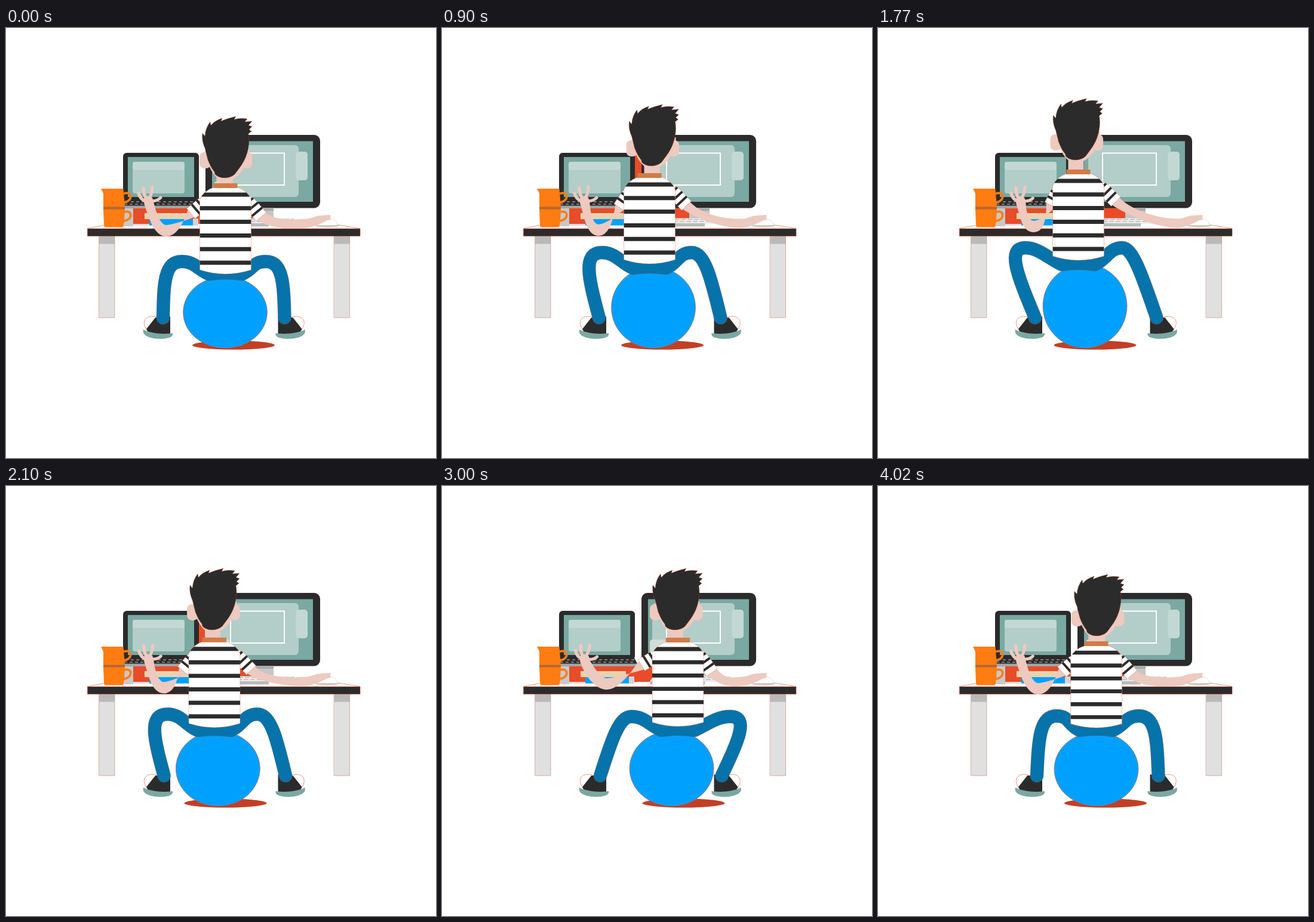
An HTML page with a canvas that plays this animation: 720 by 720 pixels, repeating every 4.05 s.

```html
<!DOCTYPE html>
<html lang="en">
<head>
<meta charset="utf-8">
<title>Bouncing at the desk</title>
<style>
html, body { margin: 0; width: 100%; height: 100%; overflow: hidden; background: #fff; }
canvas { display: block; }
</style>
</head>
<body>
<canvas id="stage" width="720" height="720"></canvas>
<script>
const g = document.getElementById('stage').getContext('2d');
const DARK = '#2b2b2b', RED = '#e84c28', SKIN = '#edc9bf', TEAL = '#7aa8a2', PANE = '#b3cdc8',
  TAB = '#c3d7d3', BLUE = '#00a1fe', JEANS = '#0673aa', ORANGE = '#ff7c12', WHITE = '#fff',
  FRINGE = 'rgba(232,76,40,.6)';
const LOOP = 4050, BOUNCE = 13.5;

// Poses: step, then one value per name below
const NAMES = ['headX', 'headY', 'left', 'chest', 'waist', 'ballX', 'ballTop', 'shadow',
  'kneeL', 'kneeR', 'kneeY', 'seat', 'ankle', 'elbowX', 'elbowY'];
const POSES = [
  [0, 329, 148, 324.5, 279, 393, 367, 416, 381, 294, 435, 391, 421, 263, 268, 349],
  [24, 313.5, 128, 304.5, 262, 376, 354, 400, 369, 268, 418, 376, 411, 263, 262, 348],
  [47, 293.5, 118, 292.5, 256, 370, 346.5, 395, 363.5, 247, 409, 368, 405, 263, 261, 342],
  [64, 326.5, 132, 323, 268, 380, 365.5, 406, 375.5, 297, 438, 378, 413, 266, 268, 347],
  [80, 353, 138, 352, 273, 384, 384.5, 410, 404.5, 317, 482, 386, 418, 265, 276, 341],
  [94, 365, 150, 358.5, 275, 385, 387, 414, 411, 322, 485, 387, 420, 265, 277, 340],
  [107, 329, 148, 322.5, 279, 387, 365.5, 412, 381, 299, 437, 385, 418, 266, 268, 349]
];
const SWING = { headY: 11, chest: 9, waist: 9, ballTop: 8, kneeY: 8, seat: 8, elbowY: 2 };

const bob = n => Math.cos(2 * Math.PI * n / BOUNCE);

// Smooth curve through the poses, with the bounce added on top
function poseAt(n) {
  const last = POSES.length - 1;
  let i = 0;
  while (i < last - 1 && n >= POSES[i + 1][0]) i++;
  const p = {};
  NAMES.forEach((name, k) => {
    const amp = SWING[name] || 0;
    const val = j => POSES[j][k + 1] - amp * bob(POSES[j][0]);
    const slope = j => {
      const a = Math.max(0, j - 1), b = Math.min(last, j + 1);
      return (val(b) - val(a)) / (POSES[b][0] - POSES[a][0]);
    };
    const h = POSES[i + 1][0] - POSES[i][0], u = (n - POSES[i][0]) / h, v = 1 - u;
    p[name] = val(i) * (1 + 2 * u) * v * v + val(i + 1) * u * u * (3 - 2 * u)
      + h * u * v * (slope(i) * v - slope(i + 1) * u) + amp * bob(n);
  });
  return p;
}

function fill(d, color, edge) {
  const path = new Path2D(d);
  g.fillStyle = color;
  g.fill(path);
  if (edge) line(path, edge, 0.6);
}
function line(d, color, width) {
  g.strokeStyle = color;
  g.lineWidth = width;
  g.lineCap = g.lineJoin = 'round';
  g.stroke(new Path2D(d));
}
function box(x, y, x2, y2, color, r = 0) {
  g.fillStyle = color;
  g.beginPath();
  g.roundRect(x, y, x2 - x, y2 - y, r);
  g.fill();
}
function oval(x, y, rx, ry, color, edge) {
  g.beginPath();
  g.ellipse(x, y, rx, ry, 0, 0, 7);
  g.fillStyle = color;
  g.fill();
  if (edge) { g.strokeStyle = edge; g.lineWidth = 0.6; g.stroke(); }
}
function at(x, y, draw, angle = 0) {
  g.save();
  g.translate(x, y);
  g.rotate(angle);
  draw();
  g.restore();
}
function dashes(d, color, width, dash) {
  g.save();
  g.setLineDash(dash);
  g.strokeStyle = color;
  g.lineWidth = width;
  g.lineCap = 'butt';
  g.stroke(new Path2D(d));
  g.restore();
}

function drawMonitor() {
  box(322, 301, 414, 328, RED);
  box(334, 179, 526, 301.5, DARK, 10);
  box(345, 189.5, 514, 291, TEAL);
  box(352, 196, 490, 283, PANE, 6);
  box(485, 207, 505, 255, TAB, 5);
  box(348, 257, 375, 283, '#d0dcd9', 5);
  g.strokeStyle = WHITE;
  g.lineWidth = 2;
  g.strokeRect(376, 209.5, 90, 53.5);
  box(414, 301.5, 448, 319, '#c6c6c6');
  box(414, 301.5, 448, 306, '#aaa');
}

function drawLaptop() {
  box(196, 209, 323, 291, DARK, 6);
  box(204, 216, 315, 283, TEAL);
  box(212, 224, 299, 277, PANE, 4);
  box(212, 224, 299, 238, TAB, 4);
  fill('M198 288H322L328 299H190Z', DARK);
  dashes('M200 291H322M198 295H324', '#ccc', 1.1, [5, 4]);
  box(192, 297.5, 328, 302, '#a5a5a5');
  box(198, 302, 213, 332, '#c9c9c9');
  box(213, 302, 322, 328, RED);
  box(213, 328, 322, 331, '#ddd');
  box(313, 319, 322, 330, '#d5d5d5');
  box(232, 310, 308, 320, '#e8d3ae');
  box(240, 320, 313, 330.5, BLUE);
}

function drawDesk() {
  fill('M348 327L354 318.5H482L492 328H440V333H348Z', '#ececec');
  dashes('M356 320.5H482M354 324H486', '#bdbdbd', 1.6, [8, 3]);
  box(348, 327, 440, 332, '#b9b9b9');
  line('M137 335.5L163 330.5M555 329.5L592 335.5', RED, 0.6);
  for (const x of [156, 549.5]) {
    box(x, 348, x + 26, 485, '#e0e0e0');
    box(x, 348, x + 26, 361.5, '#b9b9b9');
    g.strokeStyle = '#d08f80';
    g.lineWidth = 0.7;
    g.strokeRect(x, 348, 26, 137);
  }
  fill('M136.5 336H593V348.5H136.5Z', DARK, RED);
  oval(538, 330.5, 20, 3.5, '#d8c9c0');
  fill('M520 330Q521 319 540 319.5Q555 320 555 330Z', WHITE, '#d8c9c0');
}

function drawJug() {
  line('M198 277C213 273 212 291 197 292M198 308C213 304 212 322 197 323', ORANGE, 3.6);
  fill('M159 269H196.5L199 300H163V277Z', ORANGE);
  fill('M163 303H199L197.5 330Q197 333.5 193 333.5H168Q164 333.5 164 330Z', ORANGE);
  box(163, 299.5, 199, 303.5, '#b5672f');
}

function drawShoe() {
  fill('M236 506C226 492 233 482 246 483L252 484L240 507Z', WHITE, RED);
  fill('M235 504L250 485L275 483V513H240Z', DARK);
  fill('M230 505C245 512 262 513 279 511Q281 519 262 520.5C241 521 227 515 230 505Z', TEAL);
}

function legPaths(p) {
  const mid = p.left + 43, hipY = p.seat - 9;
  const shin = (ankle, knee, side) => {
    const cx = knee + side * (34 - 0.005 * (ankle - knee) ** 2);
    return { cx, x: ankle + (cx - ankle) * 0.6, y: 485 + (p.kneeY - 485) * 0.6 };
  };
  const ankleR = p.ankle + 203.5;
  const a = shin(p.ankle, p.kneeL, -1), b = shin(ankleR, p.kneeR, 1);
  const left = `M${p.ankle} 485C${a.x} ${a.y} ${a.cx} ${p.kneeY} ${p.kneeL} ${p.kneeY}`
    + `C${p.kneeL + 22} ${p.kneeY} ${mid - 48} ${hipY - 9} ${mid - 28} ${hipY}`;
  const right = `C${mid + 48} ${hipY - 9} ${p.kneeR - 22} ${p.kneeY} ${p.kneeR} ${p.kneeY}`
    + `C${b.cx} ${p.kneeY} ${b.x} ${b.y} ${ankleR} 485`;
  return {
    all: `${left}Q${mid} ${p.seat - 13} ${mid + 28} ${hipY}${right}`,
    gap: `M${mid + 28} ${hipY}${right}L${p.ballX} 485Z`
  };
}

function drawLower(p) {
  const legs = legPaths(p), ry = (536 - p.ballTop) / 2;
  oval(p.shadow, 531, 69, 7.5, '#c23f25');
  drawShoe();
  g.save();
  g.translate(730.5, 0);
  g.scale(-1, 1);
  drawShoe();
  g.restore();
  if (p.ballX > 386.5) fill(legs.gap, RED);
  oval(p.ballX, 536 - ry, 70.5, ry, BLUE, RED);
  line(legs.all, 'rgba(232,76,40,.45)', 22.8);
  line(legs.all, JEANS, 22);
  // Seat between the thighs, up to the hem
  fill(`M${p.left + 1} ${p.waist + 4}H${p.left + 85}L${p.left + 73} ${p.seat - 2}`
    + `Q${p.left + 43} ${p.seat - 4} ${p.left + 13} ${p.seat - 2}Z`, JEANS);
}

function drawSleeve(x, y, angle, length) {
  at(x, y, () => {
    const cloth = new Path2D(`M0 -6Q8 -11 18 -11H${length}V11H18Q8 11 0 6Z`);
    fill(cloth, WHITE, FRINGE);
    g.clip(cloth);
    for (const back of [35, 24, 13]) box(length - back, -12, length - back + 4, 12, DARK);
  }, angle);
}

function drawLeftArm(p, n) {
  const sx = p.left + 14, sy = p.chest + 7, ex = p.elbowX, ey = p.elbowY;
  const angle = Math.atan2(ey - 11 - sy, ex + 10 - sx), c = Math.cos(angle), s = Math.sin(angle);
  const cx = sx + 36 * c, cy = sy + 36 * s;
  fill(`M232 296C238 315 ${ex - 20} ${ey} ${ex} ${ey}Q${ex + 22} ${ey} ${cx - 9 * s} ${cy + 9 * c}`
    + `L${cx + 9 * s} ${cy - 9 * c}Q${ex + 14} ${ey - 20} ${ex} ${ey - 19}`
    + `Q${ex - 12} ${ey - 20} 247 291Z`, SKIN);
  const turn = n < 30 ? 0 : 0.04 + 0.05 * Math.exp(-(((n - 80) / 8) ** 2));
  at(239, 293, () => {
    fill('M-7 4L-9 -6Q-2 -15 6 -9L8 -1Q3 4 -7 4Z', SKIN);
    line('M-5 -3Q-14 -6 -17 -16M-4 -7Q-9 -16 -9 -25', SKIN, 5.5);
    line('M1 -8Q6 -17 6 -27M4 -4Q13 -2 20 -9', SKIN, 5);
  }, turn);
  drawSleeve(sx, sy, angle, 38);
}

function drawRightArm(p, n) {
  const sx = p.left + 76, sy = p.chest + 5, angle = 0.78 + (p.left - 292) * 0.003;
  const c = Math.cos(angle), s = Math.sin(angle);
  const cx = sx + 40 * c, cy = sy + 40 * s;
  const ax = cx - 9 * s, ay = cy + 9 * c, bx = cx + 9 * s, by = cy - 9 * c;
  fill(`M${ax} ${ay}C${ax + 20} ${Math.min(ay + 14, 340)} 470 338 508 334`
    + `L524 328L522 316L508 319C475 322 ${bx + 18} ${by + Math.min(22, 322 - by)} ${bx} ${by}Z`, SKIN);
  const click = (n > 58 && n < 69) || (n > 88 && n < 99);
  if (click) {
    fill('M506 320L522 314L532 319L524 328L508 334Z', SKIN);
    line('M520 319Q527 308 537 306M524 319Q533 311 541 311M525 321L540 317', SKIN, 4.5);
  } else {
    fill('M506 320C514 317 521 314 527 314L542 313Q546 315 542 317L544 319Q544 322 538 322L524 329L508 334Z', SKIN);
  }
  drawSleeve(sx, sy, angle, 42);
}

function drawShirt(p) {
  g.save();
  g.translate(p.left, p.chest);
  g.scale(1, (p.waist - p.chest) / 114);
  const torso = new Path2D('M23 -12H64Q79 -7 86 8V126Q43 140 0 126V8Q7 -7 23 -12Z');
  fill(torso, WHITE, FRINGE);
  g.clip(torso);
  for (let i = 0; i < 6; i++) box(0, i * 22.8 - 3.5, 86, i * 22.8 + 3.5, DARK);
  g.restore();
  box(p.left + 23, p.chest - 19, p.left + 63, p.chest - 11, '#d07c48');
}

function drawHead() {
  box(-5, 60, 14, 87, SKIN, 8);
  box(65, 60, 83.5, 87, SKIN, 8);
  fill('M6 60L11 83Q22 108 38 108Q55 107 67 90L78 66V55Z', SKIN);
  fill('M4 53C0 44 -1 36 0 28L4 33Q5 19 13 9L14 15Q22 6 33 3L31 8Q42 3 56 0L53 5Q63 2 75 4'
    + 'L71 9L83 8L77 15L83 17L78 22L82 25L77 29Q79 40 77 51C75 66 68 79 60 89L54 97Q47 103 37 103'
    + 'Q27 103 21 97L20 93Q14 86 9 73Z', DARK, FRINGE);
}

function draw(n) {
  const p = poseAt(n);
  g.fillStyle = WHITE;
  g.fillRect(0, 0, 720, 720);
  if (p.headX < 327) box(322, p.headY + 70, 335, 302, RED);
  drawMonitor();
  drawLaptop();
  drawDesk();
  drawJug();
  drawLower(p);
  box(p.headX + 25, p.headY + 90, p.headX + 51, p.chest - 8, SKIN);
  drawLeftArm(p, n);
  drawRightArm(p, n);
  drawShirt(p);
  at(p.headX, p.headY, drawHead);
}

// Four steps in every 150 ms, the first one held twice as long
function stepAt(ms) {
  const rest = ms % 150;
  return Math.floor(ms / 150) * 4 + (rest < 60 ? 0 : Math.floor(rest / 30) - 1);
}

const start = performance.now();
function tick() {
  draw(stepAt((performance.now() - start) % LOOP));
  requestAnimationFrame(tick);
}
tick();
</script>
</body>
</html>
```
